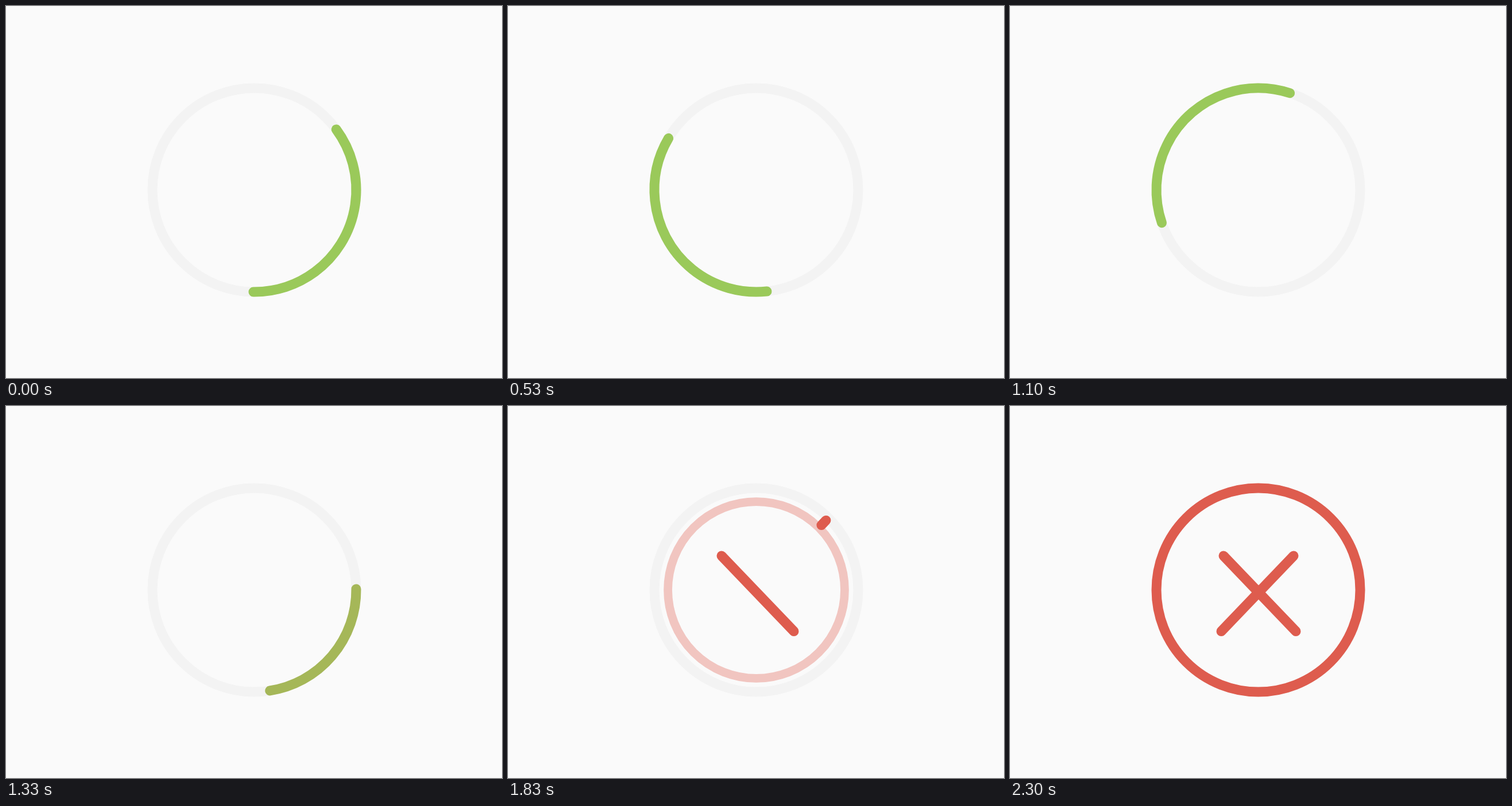
An HTML page with a canvas that plays this animation: 864 by 648 pixels, repeating every 2.33 s.

```html
<!DOCTYPE html>
<html lang="en">
<head>
<meta charset="utf-8">
<title>Loader</title>
<style>
  html, body { margin: 0; width: 100%; height: 100%; overflow: hidden; background: #fafafa; }
  canvas { display: block; }
</style>
</head>
<body>
<canvas id="stage" width="864" height="648"></canvas>
<script>
const ctx = document.getElementById('stage').getContext('2d');
const LOOP = 2330, FPS = 30;
const CX = 432.5, CY = 320.5, RADIUS = 177.5, WEIGHT = 17;
const GREEN = [154, 201, 90], RED = [222, 92, 78];
const STOP = 1305; // degrees travelled when the arc reaches the upper left corner

// Arc ends as [ms, degrees], clockwise
const HEAD = [[0, 90.5], [240, 307], [533, 570.2], [767, 793.7], [1100, 1008.1], [1567, 1304.2], [1640, STOP]];
const TAIL = [[0, -36.5], [240, 208], [533, 443.7], [767, 724], [1100, 881.2], [1567, 1287.4], [1640, STOP]];

const clamp = x => Math.min(1, Math.max(0, x));
const mix = (a, b, p) => a + (b - a) * p;
const easeInOut = x => x < 0.5 ? 2 * x * x : 1 - 2 * (1 - x) ** 2;
const progress = (t, start, duration) => easeInOut(clamp((t - start) / duration));
const rgb = c => `rgb(${c.map(Math.round).join(',')})`;

function slope(keys, i) {
  const a = keys[Math.max(0, i - 1)], b = keys[Math.min(keys.length - 1, i + 1)];
  return (b[1] - a[1]) / (b[0] - a[0]);
}

function sample(keys, t) {
  const i = keys.findIndex(k => k[0] > t) - 1;
  if (i < 0) return STOP;
  const [t0, v0] = keys[i], [t1, v1] = keys[i + 1];
  const span = t1 - t0, x = (t - t0) / span;
  const smooth = x * x * (3 - 2 * x);
  const value = mix(v0, v1, smooth)
    + span * x * (1 - x) * ((1 - x) * slope(keys, i) - x * slope(keys, i + 1));
  return Math.min(STOP, value);
}

function arc(color, radius, from, to, weight = WEIGHT) {
  const rad = Math.PI / 180;
  ctx.strokeStyle = color;
  ctx.lineWidth = weight;
  ctx.beginPath();
  ctx.arc(CX, CY, radius, from * rad, to * rad);
  ctx.stroke();
}

// A stroke slides in from the ring: its tail stops at "near", its head at "far"
function slideIn(entry, near, far, p) {
  if (p <= 0) return;
  ctx.strokeStyle = rgb(RED);
  ctx.lineWidth = WEIGHT;
  ctx.beginPath();
  ctx.moveTo(mix(entry[0], near[0], p), mix(entry[1], near[1], p));
  ctx.lineTo(mix(entry[0], far[0], p), mix(entry[1], far[1], p));
  ctx.stroke();
}

function draw(t) {
  ctx.fillStyle = '#fafafa';
  ctx.fillRect(0, 0, 864, 648);
  ctx.lineCap = 'round';

  ctx.save();
  const drift = Math.sin(Math.PI * clamp((t - 600) / 333)) * 2.2;
  ctx.translate(drift, drift);
  arc('#f3f3f3', RADIUS, 0, 360);
  if (t < 1640) {
    const redness = clamp((t - 1300) / 200);
    const color = rgb(GREEN.map((c, i) => mix(c, RED[i], redness)));
    arc(color, RADIUS, sample(TAIL, t), sample(HEAD, t));
  }
  ctx.restore();

  const ring = progress(t, 1700, 325);
  if (ring > 0) {
    const scale = mix(0.8, 1, ring);
    ctx.globalAlpha = ring;
    arc(rgb(RED), RADIUS * scale, 0, 360, WEIGHT * scale);
    ctx.globalAlpha = 1;
  }

  slideIn([307, 195], [372, 261], [498, 392.5], progress(t, 1570, 250));
  slideIn([558, 195], [494, 261], [368, 392.5], progress(t, 1762, 400));
}

const start = performance.now();
function tick() {
  const t = (performance.now() - start) % LOOP;
  draw(Math.floor((t + 4) * FPS / 1000) % 70 * 1000 / FPS);
  requestAnimationFrame(tick);
}
tick();
</script>
</body>
</html>
```
